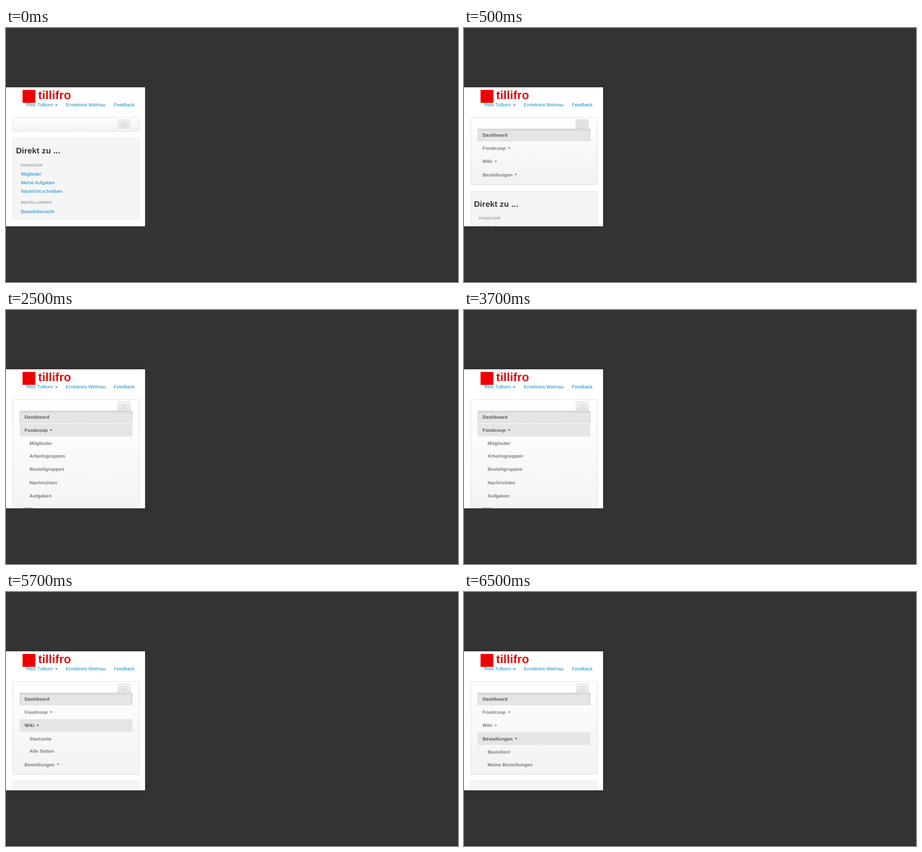
An HTML page for the animation above (8 s loop, 998 by 561 pixels).

```html
<!DOCTYPE html>
<html lang="de">
<head>
<meta charset="utf-8">
<title>Mobile Navigation</title>
<style>
* { box-sizing: border-box; margin: 0; padding: 0; }
html, body { width: 100%; height: 100%; overflow: hidden; background: #333; }
body { position: relative; border-bottom: 1px solid #1c1c1c; }
ul { list-style: none; }
#page {
  position: absolute; left: 0; top: 131.4px; width: 420px; height: 420px; overflow: hidden;
  transform: scale(.731); transform-origin: 0 0; background: #fff; color: #333;
  font: 14px/20px "Liberation Sans", Arial, sans-serif; letter-spacing: .11px;
  text-rendering: geometricPrecision; white-space: nowrap;
}
.mark { position: absolute; left: 50px; top: 7.5px; width: 39px; height: 39px; background: #e00; }
.brand { position: absolute; left: 97px; top: 3px; font: bold 35.5px/40px "Liberation Sans", Arial, sans-serif; color: #e00; }
.link { position: absolute; top: 43px; color: #08c; }
.caret {
  display: inline-block; vertical-align: top; margin: 8px 0 0 2px;
  border: 4px solid transparent; border-top-color: currentColor; border-bottom: 0;
}
.link .caret { margin-top: 9px; }

#content { position: absolute; left: 20px; top: 91px; width: 383px; }
#navbar {
  position: relative; min-height: 42px; padding: 33px 20px 0; margin-bottom: 20px;
  border: 1px solid #d4d4d4; border-radius: 4px;
  background: linear-gradient(#fff, #f2f2f2); box-shadow: 0 1px 4px rgba(0,0,0,.065);
}
#toggle {
  position: absolute; right: 25px; top: 5px; width: 40px; height: 28px; padding: 7px 10px;
  border: 1px solid #ccc; border-bottom-color: #b3b3b3; border-radius: 4px;
  background: linear-gradient(#f2f2f2, #e5e5e5);
}
#toggle.hover { background: #e5e5e5; }
#toggle i {
  display: block; height: 2px; margin-bottom: 3px; border-radius: 1px;
  background: #f5f5f5; box-shadow: 0 1px 0 rgba(0,0,0,.25);
}
#menu { display: none; padding-bottom: 8px; font-weight: bold; letter-spacing: .26px; color: #777; }
#menu.shown { display: block; }
#menu p { height: 38px; padding: 9px 15px; margin-bottom: 2px; border-radius: 3px; }
#menu .active { color: #555; background: #e5e5e5; box-shadow: inset 0 3px 8px rgba(0,0,0,.125); }
#menu ul { display: none; padding: 0 15px; }
#menu ul li:first-child p { margin-bottom: 0; }
#menu .open > p { color: #555; background: #e5e5e5; }
#menu .open ul { display: block; }

#well {
  padding: 9px; border: 1px solid #e3e3e3; border-radius: 3px;
  background: #f5f5f5; box-shadow: inset 0 1px 1px rgba(0,0,0,.05);
}
h3 { margin: 10px 0; font-size: 24.5px; line-height: 40px; letter-spacing: .26px; }
#well li { padding: 3px 15px; color: #08c; }
#well .head { font-size: 11px; font-weight: bold; letter-spacing: .2px; color: #999; }
#well li + .head { margin-top: 9px; }
</style>
</head>
<body>
<div id="page">
  <div class="mark"></div>
  <div class="brand">tillifro</div>
  <span class="link" style="left:62px">Resi Tulborn <b class="caret"></b></span>
  <span class="link" style="left:181px">Erntekreis Welmau</span>
  <span class="link" style="left:326px">Feedback</span>
  <div id="content">
    <div id="navbar">
      <div id="toggle"><i></i><i></i><i></i></div>
      <ul id="menu"></ul>
    </div>
    <div id="well">
      <h3>Direkt zu ...</h3>
      <ul>
        <li class="head">FOODCOOP</li>
        <li>Mitglieder</li>
        <li>Meine Aufgaben</li>
        <li>Nachricht schreiben</li>
        <li class="head">BESTELLUNGEN</li>
        <li>Bestellübersicht</li>
      </ul>
    </div>
  </div>
</div>
<script>
const LOOP = 8000, FIRST = 500, STEP = 2000;
const entries = {
  Dashboard: [],
  Foodcoop: ["Mitglieder", "Arbeitsgruppen", "Bestellgruppen", "Nachrichten", "Aufgaben"],
  Wiki: ["Startseite", "Alle Seiten"],
  Bestellungen: ["Bestellen!", "Meine Bestellungen"]
};
const menu = document.getElementById("menu");
const toggle = document.getElementById("toggle");

menu.innerHTML = Object.entries(entries).map(([name, subs]) => subs.length
  ? `<li><p>${name} <b class="caret"></b></p><ul>${subs.map(s => `<li><p>${s}</p></li>`).join("")}</ul></li>`
  : `<li><p class="active">${name}</p></li>`).join("");

// Step 0: menu closed, 1: menu shown, 2 to 4: one submenu open
let shown = -1;
function draw() {
  const t = performance.now() % LOOP;
  const step = t < FIRST ? 0 : 1 + Math.floor((t - FIRST) / STEP);
  if (step !== shown) {
    shown = step;
    menu.classList.toggle("shown", step > 0);
    toggle.classList.toggle("hover", step === 1);
    [...menu.children].forEach((li, i) => li.classList.toggle("open", i > 0 && i === step - 1));
  }
  requestAnimationFrame(draw);
}
draw();
</script>
</body>
</html>
```
